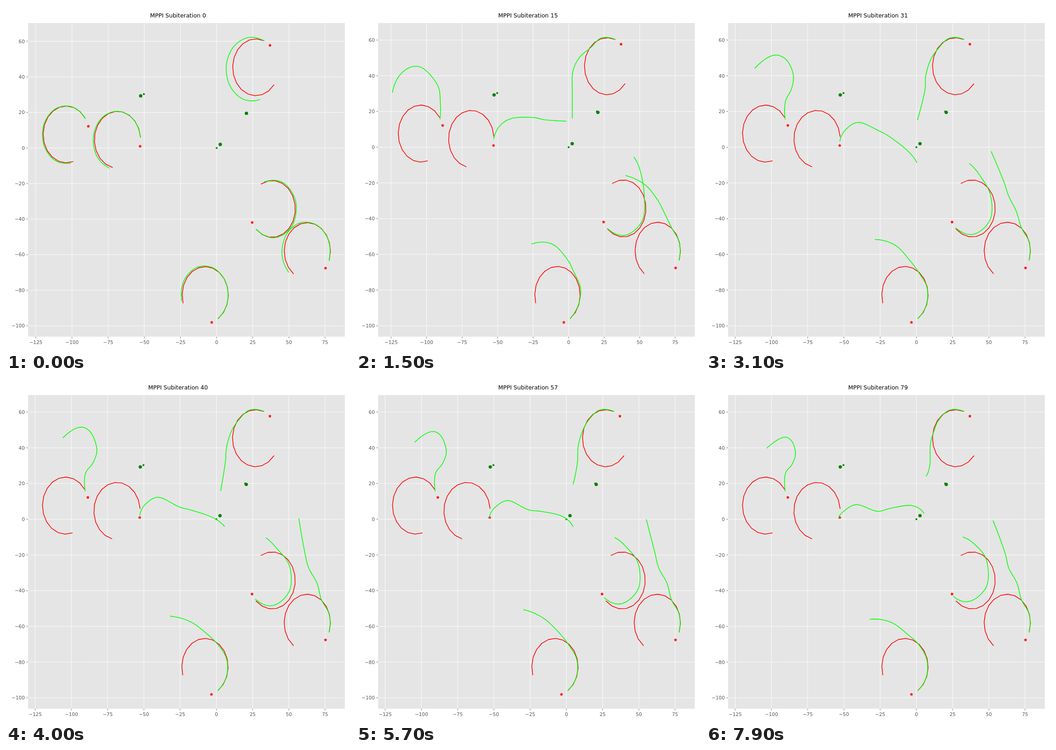
An HTML page with a canvas that plays this animation: 748x748 px, repeating every 8 s.

```html
<!DOCTYPE html>
<html lang="en">
<head>
<meta charset="utf-8">
<title>MPPI Subiteration</title>
<style>
html, body { margin: 0; width: 100%; height: 100%; overflow: hidden; background: #fff }
canvas { display: block }
</style>
</head>
<body>
<canvas id="c" width="748" height="748"></canvas>
<script>
const g = document.getElementById('c').getContext('2d');
const TICK = 100, LOOP = 80, FONT = 'px "DejaVu Sans", sans-serif';
const BOX = { l: 48, r: 736.8, t: 37, b: 719 };
const STEPS = 14, STEP = 5, MAX_TURN = 18, RAD = Math.PI / 180;

// Chart units of a stage point in the resting view
const unit = ([x, y]) => [(x - 457.5) / 3.154, (306.5 - y) / 3.894];
const mix = (a, b, u) => a + (b - a) * u;

// n + 1 points on the arc of a vehicle that turns evenly at every step
function arc([x, y], heading, turn, n) {
  const size = STEP / Math.sin(turn / 2 * RAD);
  return Array.from({ length: n + 1 }, (_, i) => {
    const half = STEPS * turn * i / n / 2;
    const chord = size * Math.sin(half * RAD), dir = (heading - turn / 2 + half) * RAD;
    return [x + chord * Math.cos(dir), y + chord * Math.sin(dir)];
  });
}

// Catmull-Rom curve, with both ends continued quadratically
function curve(pts, per = 5) {
  const beyond = (a, b, c) => a.map((v, j) => 3 * v - 3 * b[j] + c[j]);
  const p = [beyond(...pts), ...pts, beyond(...pts.slice(-3).reverse())];
  const out = [pts[0]];
  for (let i = 1; i < pts.length; i++)
    for (let k = 1; k <= per; k++) {
      const u = k / per;
      out.push([0, 1].map(j => {
        const [a, b, c, d] = p.slice(i - 1, i + 3).map(q => q[j]);
        return b + u / 2 * (c - a + u * (2 * a - 5 * b + 4 * c - d + u * (3 * (b - c) + d - a)));
      }));
    }
  return out;
}

// Each vehicle: start and heading of its tightest turn, first plan as [heading, turn],
// key points shared by all later plans, and the remaining ones by iteration
const vehicles = [
  {
    start: [171, 241.5], heading: 133.5, first: [133.4, 17.66],
    head: [[172, 245], [172.5, 207]],
    tails: {
      8: [[160, 170], [120, 146.5], [94, 157.5], [77.5, 188], [75, 244]],
      13: [[162, 170], [122, 133], [90, 137], [66, 165], [60, 200]],
      22: [[182.5, 175], [182, 142.5], [164.5, 114], [131, 106.5], [88.5, 139.5]],
      40: [[189, 183.5], [197.5, 154], [184, 117], [159, 106], [124, 128.5]],
      79: [[187, 187], [194.5, 163], [186.5, 136.5], [167.5, 128], [132.5, 151]]
    }
  },
  {
    start: [291.5, 283], heading: 104, first: [105, 17.5],
    head: [],
    tails: {
      8: [[291, 287], [307, 255], [335, 240], [380, 221], [408, 210.5], [444, 172.5], [462, 142]],
      22: [[291, 289], [305.5, 261], [333.5, 246], [376, 262], [398, 282.5], [427.5, 325.5], [442, 357.5]],
      40: [[291, 297], [303.5, 273.5], [332, 258.5], [375, 279], [404, 287], [449, 302.5], [475, 322]],
      49: [[290.5, 302], [303, 278], [332, 262.5], [374, 284], [403, 292], [448, 308], [471, 333]],
      79: [[289, 303.5], [298.5, 290], [327.5, 274.5], [371, 289], [402, 282.5], [446.5, 276.5], [474, 293.5]]
    }
  },
  {
    start: [560.5, 71.5], heading: 168.6, first: [161, 16],
    head: [[560.5, 71], [529.5, 68.5], [507, 89]],
    tails: {
      8: [[476, 105], [457, 134], [457, 190], [478.5, 237]],
      22: [[487, 116.5], [476, 152], [474.5, 185.5], [453, 249.5]],
      40: [[490, 115], [479.5, 150], [477, 182], [467, 244]],
      79: [[497, 111], [488, 143], [487, 187], [479, 212]]
    }
  },
  {
    start: [544, 485], heading: -34.6, first: [-36, 17.6],
    head: [],
    tails: {
      8: [[544, 484], [586, 498.5], [623.5, 465], [630, 408], [632.5, 355], [625, 320]],
      22: [[543.5, 484], [585, 497.5], [620, 465], [620.5, 411.5], [601.5, 364.5], [580, 337]],
      40: [[542.5, 481], [582, 494.5], [617, 462], [616.5, 408], [588, 369], [566, 347.5]],
      79: [[538, 475], [575.5, 485], [611, 451.5], [610, 395], [584.5, 361.5], [559, 345.5]]
    }
  },
  {
    start: [703, 552.5], heading: 80, first: [81.7, 17.2],
    head: [[703, 552.5], [703, 514], [686, 482]],
    tails: {
      8: [[668, 455], [648.5, 425], [609, 397], [565, 409.5]],
      22: [[674, 448], [658.5, 413.5], [643, 378], [604, 327]],
      40: [[676.5, 446], [658.5, 413], [649.5, 377], [637, 305.5]],
      79: [[676.5, 446], [658.5, 413], [649.5, 377], [624.5, 310]]
    }
  },
  {
    start: [461, 680], heading: 43.2, first: [44.2, 17.6],
    head: [[461, 680], [479.5, 649]],
    tails: {
      8: [[487, 615], [474.5, 580.5], [458, 549.5], [419, 524.5], [373, 537.5]],
      22: [[481, 612], [465.5, 581.5], [450, 551], [422.5, 510.5], [378, 497]],
      40: [[480, 612], [462.5, 582], [437.5, 557], [401, 530], [357.5, 518]],
      65: [[480, 612], [463, 580.5], [443, 552], [410, 518], [368, 497]],
      79: [[480, 612], [463, 580.5], [439, 558], [402, 531], [356.5, 524.5]]
    }
  }
];

const red = vehicles.map(v => arc(unit(v.start), v.heading, MAX_TURN, STEPS));
const plans = vehicles.map(v => {
  const later = Object.entries(v.tails).map(([n, tail]) =>
    ({ n: +n, pts: [...v.head, ...tail].map(unit) }));
  return [{ n: 0, pts: arc(unit(v.start), ...v.first, later[0].pts.length - 1) }, ...later];
});

function planAt(keys, n) {
  const i = Math.max(1, keys.findIndex(k => k.n >= n));
  const a = keys[i - 1], b = keys[i], u = (n - a.n) / (b.n - a.n);
  return curve(a.pts.map((p, k) => p.map((v, j) => mix(v, b.pts[k][j], u))));
}

const stars = [[-88.7, 12.2], [-52.9, .95], [36.9, 57.7], [24.6, -41.9], [75.3, -67.6], [-3.4, -98.1]];
const bigDots = [[-52.5, 29.3], [20.6, 19.5], [2.5, 2]];
const smallDots = [[-50.3, 30.3], [0, 0], [19.9, 20]];

// Map the data range plus a 5% margin onto [from, to]
function axis(values, from, to) {
  const lo = Math.min(...values), hi = Math.max(...values), r = hi - lo;
  return v => mix(from, to, (v - lo + .05 * r) / (1.1 * r));
}

function line(pts, color, width, cap = 'butt') {
  g.strokeStyle = color;
  g.lineWidth = width;
  g.lineCap = cap;
  g.lineJoin = 'round';
  g.beginPath();
  pts.forEach(p => g.lineTo(...p));
  g.stroke();
}

function dot([x, y], r) {
  g.fillStyle = '#008000';
  g.beginPath();
  g.arc(x, y, r, 0, 7);
  g.fill();
}

function star([x, y]) {
  g.fillStyle = g.strokeStyle = '#f00';
  g.lineWidth = 1.04;
  g.lineJoin = 'bevel';
  g.beginPath();
  for (let i = 0; i < 10; i++) {
    const r = i % 2 ? 1.19 : 3.12, a = i * Math.PI / 5;
    g.lineTo(x + r * Math.sin(a), y - r * Math.cos(a));
  }
  g.closePath();
  g.fill();
  g.stroke();
}

function text(s, x, y, size, color, align) {
  g.font = size + FONT;
  g.fillStyle = color;
  g.textAlign = align;
  g.fillText(s, x, y);
}

function draw(n) {
  const lime = plans.map(p => planAt(p, n));
  const all = [...red.flat(), ...lime.flat(), ...stars];
  const X = axis(all.map(p => p[0]), BOX.l, BOX.r);
  const Y = axis(all.map(p => p[1]), BOX.b, BOX.t);
  const at = p => [X(p[0]), Y(p[1])];
  const label = v => String(v).replace('-', '\u2212');

  g.fillStyle = '#fff';
  g.fillRect(0, 0, 748, 748);
  g.fillStyle = '#e5e5e5';
  g.fillRect(BOX.l, BOX.t, BOX.r - BOX.l, BOX.b - BOX.t);

  for (let v = -125; v <= 75; v += 25) {
    const x = X(v);
    line([[x, BOX.t], [x, BOX.b]], '#fff', .9);
    line([[x, BOX.b], [x, BOX.b + 3.6]], '#555', .83);
    text(label(v), x, 734.6, 10.39, '#555', 'center');
  }
  for (let v = -100; v <= 60; v += 20) {
    const y = Y(v);
    line([[BOX.l, y], [BOX.r, y]], '#fff', .9);
    line([[BOX.l - 3.6, y], [BOX.l, y]], '#555', .83);
    text(label(v), BOX.l - 7.2, y + 3.8, 10.39, '#555', 'right');
  }

  bigDots.forEach(p => dot(at(p), 3.65));
  smallDots.slice(0, n ? 3 : 2).forEach(p => dot(at(p), 2.08));
  stars.forEach(p => star(at(p)));
  red.forEach(p => line(p.map(at), '#f00', 1.56, 'square'));
  lime.forEach(p => line(p.map(at), '#0f0', 1.56, 'square'));
  text('MPPI Subiteration ' + n, 374, 25.4, 12.47, '#000', 'center');
}

const start = performance.now();
function tick() {
  draw(Math.floor((performance.now() - start) / TICK) % LOOP);
  requestAnimationFrame(tick);
}
tick();
</script>
</body>
</html>
```
